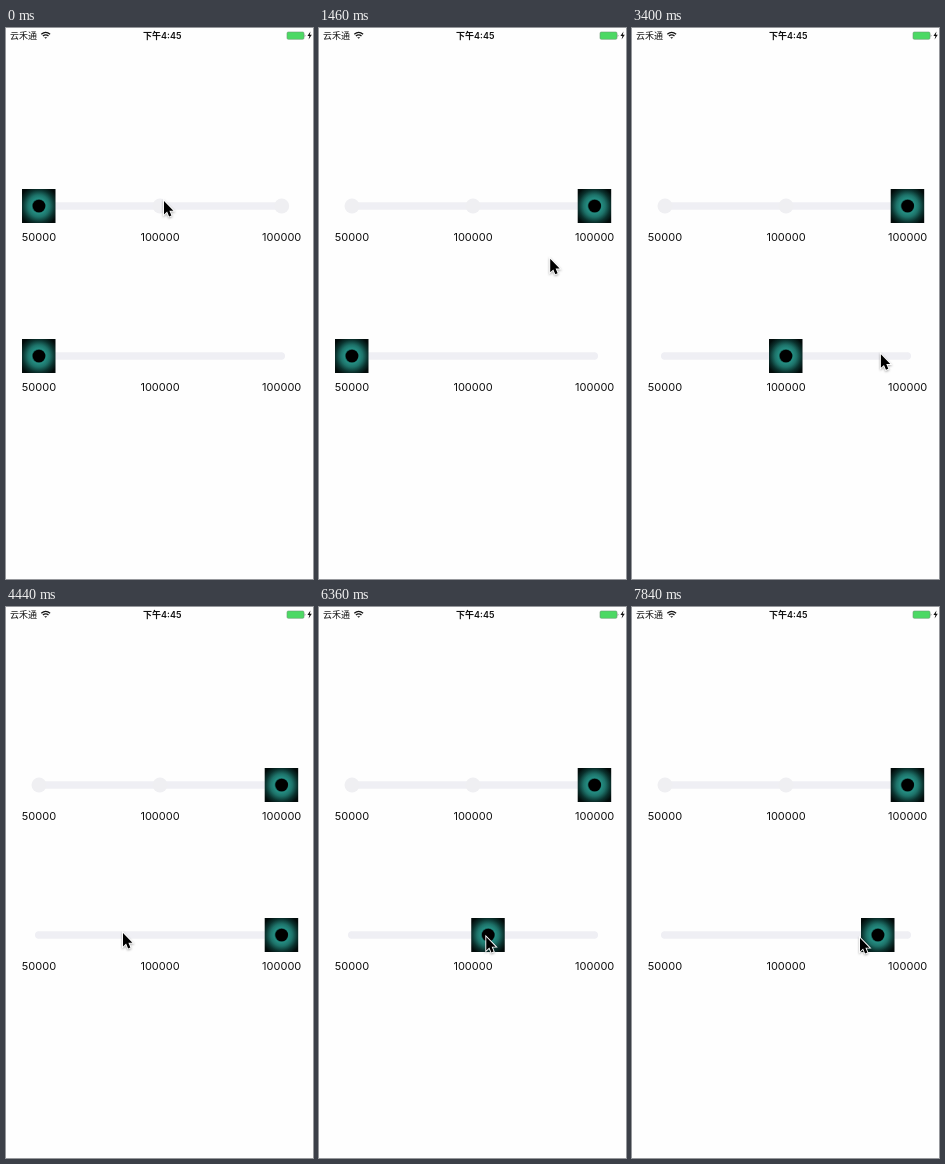
Animation of 307x551 px, one loop 7.99 s. Source, as an HTML page:

```html
<!DOCTYPE html>
<html lang="zh">
<head>
<meta charset="utf-8">
<style>
html, body { margin: 0; width: 100%; height: 100%; overflow: hidden; background: #fefefe; }
svg { display: block; }
.label { font: 11px Inter, sans-serif; text-anchor: middle; fill: #111; }
.status { font: 9px Inter, "Noto Sans CJK SC", "Noto Sans CJK", sans-serif; fill: #111; }
.clock { font-weight: 600; text-anchor: middle; }
</style>
</head>
<body>
<svg width="307" height="551" viewBox="0 0 307 551">
  <defs>
    <radialGradient id="iris" r=".68">
      <stop offset=".24" stop-color="#0a3d39"/>
      <stop offset=".32" stop-color="#248c81"/>
      <stop offset=".48" stop-color="#1d7269"/>
      <stop offset=".7" stop-color="#0a312d"/>
      <stop offset=".9" stop-color="#020b0a"/>
    </radialGradient>
    <g id="eye">
      <rect x="-17" y="-17" width="33.5" height="34" fill="url(#iris)"/>
      <circle r="6.3"/>
    </g>
    <g id="track">
      <rect x="29" y="-3.7" width="250" height="7.4" rx="3.7" fill="#efeff4"/>
      <g class="label">
        <text x="33" y="35">50000</text>
        <text x="154" y="35">100000</text>
        <text x="275.7" y="35">100000</text>
      </g>
    </g>
  </defs>

  <g class="status">
    <text x="4" y="11">云禾通</text>
    <text class="clock" x="156.3" y="11">下午4:45</text>
  </g>
  <g fill="none" stroke="#111" stroke-width="1.3">
    <path d="M35.3 6.3Q39.7 2.5 44.1 6.3M36.9 8.1Q39.7 5.7 42.5 8.1"/>
    <path d="M38.2 9.2h3l-1.5 1.6z" fill="#111" stroke="none"/>
  </g>
  <rect x="281" y="4" width="17" height="7.3" rx="1.3" fill="#4cd964" stroke="#6b9a72" stroke-width=".6"/>
  <path d="M298.8 6.2q1.2 1.4 0 2.8z" fill="#333"/>
  <path d="M304.5 3.6l-3.1 4.5h2l-.8 3.4 3.2-4.7h-2z" fill="#111"/>

  <g transform="translate(0 178)">
    <use href="#track"/>
    <g fill="#efeff2"><circle cx="33" r="7.5"/><circle cx="154" r="7.5"/><circle cx="275.7" r="7.5"/></g>
  </g>
  <use href="#track" y="328"/>
  <use href="#eye" id="top"/>
  <use href="#eye" id="bottom"/>
  <g id="cursor">
    <path d="M0 0V13.4L3.1 10.6 5.1 15.4 7.4 14.5 5.4 9.7H9.4Z" stroke="#fff" stroke-width="1.8" paint-order="stroke"
      style="filter: drop-shadow(0 1px 1px #0005)"/>
  </g>
</svg>
<script>
const LOOP = 7990, STEP = 148, LAST = 53;
const LEFT = 33, MIDDLE = 154, RIGHT = 275.7;

// Pointer trips: first step, last step, destination.
const START = [158, 173];
const TRIPS = [
  [1, 6, 263, 188], [9, 15, 159, 328], [20, 25, 266, 326], [27, 30, 117, 326], [31, 35, 272, 329],
  [36, 40, 207, 330], [41, 45, 154, 330], [46, 48, 176, 328], [48, 53, 228, 331],
];

const easeOut = p => 1 - (1 - p) ** 2;
const ramp = (n, from, to) => Math.max(0, Math.min(1, (n - from) / (to - from)));

function pointer(n) {
  return TRIPS.reduce(([x, y], [from, to, endX, endY]) => {
    const p = easeOut(ramp(n, from, to));
    return [x + (endX - x) * p, y + (endY - y) * p];
  }, START);
}

// Taps snap the thumb to a stop.
function topThumb(n) {
  return n < 1 ? LEFT : n < 9 ? MIDDLE : RIGHT;
}

// Two taps, then a drag that follows the pointer and finally runs ahead of it.
function bottomThumb(n) {
  if (n < 20) return LEFT;
  if (n < 27) return MIDDLE;
  if (n < 37) return RIGHT;
  return pointer(Math.min(n, 46))[0] + 2 + 90 * ramp(n, 46, LAST) ** 2;
}

function place(id, x, y) {
  document.getElementById(id).setAttribute("transform", `translate(${x} ${y})`);
}

// The screen updates at a low, slightly drifting rate.
function draw() {
  const t = performance.now() % LOOP;
  const n = Math.min(LAST, Math.floor((t * 0.9975 + 26) / STEP));
  place("top", topThumb(n), 178);
  place("bottom", bottomThumb(n), 328);
  place("cursor", ...pointer(n));
  requestAnimationFrame(draw);
}
draw();
</script>
</body>
</html>
```
